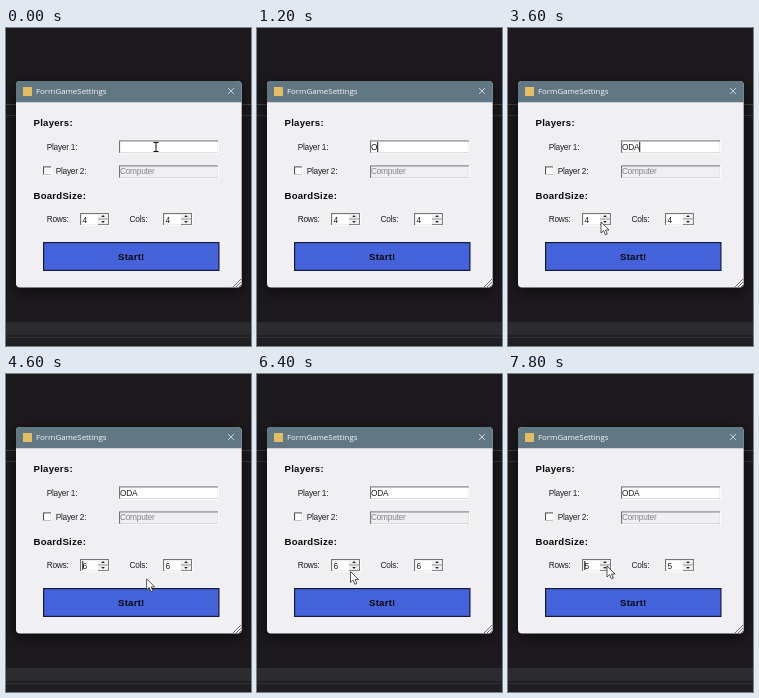
An HTML page with a canvas for the animation above (8000 ms loop, 245x318 px).

```html
<!DOCTYPE html>
<html lang="en">
<head>
<meta charset="utf-8">
<style>
  html, body { margin: 0; width: 100%; height: 100%; overflow: hidden; background: #1c1a1c; }
  canvas { display: block; width: 245px; height: 318px; }
</style>
</head>
<body>
<canvas id="stage"></canvas>
<script>
const W = 245, H = 318, LOOP = 8000, STEP = 200, BLINK = 530;
const canvas = document.getElementById('stage');
const ctx = canvas.getContext('2d');
const scale = window.devicePixelRatio || 1;
canvas.width = W * scale;
canvas.height = H * scale;

const SANS = '"Liberation Sans", Arial, sans-serif';
const LABEL = { font: `8.3px ${SANS}`, spacing: '-0.25px', color: '#202022' };
const MUTED = { ...LABEL, color: '#858588' };
const HEADING = { font: `bold 9.6px ${SANS}`, spacing: '0.25px', color: '#080808' };
const TITLE = { font: '7.9px "Open Sans", "Noto Sans", sans-serif', spacing: '0px', color: '#f6f8f9' };
const PLAYER = 'ODA';

const keyTimes = [1000, 1400, 2200];
const sizeChanges = [[0, 4], [3900, 5], [4300, 6], [7300, 5]];
const caretResets = [400, ...keyTimes, 3900, 4300, 7300];
// Pointer positions as [time, x, y]
const path = [
  [2700, 150, 119], [3400, 93, 194], [3700, 93, 194], [3900, 97, 189],
  [4300, 97, 189], [4800, 164.3, 213.5], [5500, 164.3, 213.5], [6200, 93.5, 197.5],
  [6500, 93.5, 197.5], [7100, 99, 192], [8000, 99, 192]
];

function rect(x, y, w, h, color) {
  ctx.fillStyle = color;
  ctx.fillRect(x, y, w, h);
}

function setFont({ font, spacing }) {
  ctx.font = font;
  ctx.letterSpacing = spacing;
}

function text(str, x, y, style = LABEL) {
  setFont(style);
  ctx.fillStyle = style.color;
  ctx.fillText(str, x, y);
}

function polyline(points, color, width = 1) {
  ctx.beginPath();
  points.forEach(([x, y]) => ctx.lineTo(x, y));
  ctx.strokeStyle = color;
  ctx.lineWidth = width;
  ctx.stroke();
}

function roundBox(x, y, w, h, radii, color) {
  ctx.fillStyle = color;
  ctx.beginPath();
  ctx.roundRect(x, y, w, h, radii);
  ctx.fill();
}

function sunken(x, y, w, h, fill, edge = '#747477') {
  rect(x, y, w, h, '#fafafa');
  rect(x, y, w - 1, h - 1, edge);
  rect(x + 1, y + 1, w - 2, h - 2, '#d8d8da');
  rect(x + 1.4, y + 1.4, w - 2.8, h - 2.8, fill);
}

function spinner(x, value) {
  sunken(x, 185, 30, 13, '#fff');
  text(value, x + 2.6, 194.8);
  for (const [y, dir] of [[186, -1], [191.5, 1]]) {
    rect(x + 18, y, 11, 5.5, '#78787a');
    rect(x + 18, y, 10, 4.6, '#efeff0');
    const cx = x + 23, cy = y + 2.3;
    ctx.fillStyle = '#222';
    ctx.beginPath();
    ctx.moveTo(cx - 1.8, cy - dir * 0.8);
    ctx.lineTo(cx + 1.8, cy - dir * 0.8);
    ctx.lineTo(cx, cy + dir * 1.2);
    ctx.fill();
  }
}

function background() {
  rect(0, 0, W, H, '#1c1a1c');
  rect(0, 76, W, 1, '#454144');
  rect(0, 87, W, 1, '#373437');
  rect(0, 294, W, 13, '#2c2b2e');
  rect(0, 307, W, 2, '#201f21');
  rect(0, 309, W, 1, '#323134');
  rect(0, 310, W, 8, '#1f1e20');
}

function windowFrame() {
  ctx.save();
  ctx.shadowColor = 'rgba(0,0,0,.6)';
  ctx.shadowBlur = 14 * scale;
  ctx.shadowOffsetY = 4 * scale;
  roundBox(10, 53, 225.7, 206.5, 4, '#f0eff2');
  ctx.restore();

  roundBox(10, 53, 225.7, 21.3, [4, 4, 0, 0], '#617783');
  rect(17, 59, 9, 9, '#e3bd62');
  text('FormGameSettings', 30, 66, TITLE);
  polyline([[222, 60], [228, 66]], '#dfe5e8', 0.8);
  polyline([[228, 60], [222, 66]], '#dfe5e8', 0.8);
  for (const d of [2, 5, 8]) polyline([[235 - d, 259], [235, 259 - d]], '#6f6f72');
}

function startButton(raised) {
  const [left, top, right, bottom] = [37.6, 214.6, 212.9, 242.4];
  rect(left, top, right - left, bottom - top, '#4463db');
  ctx.strokeStyle = '#141a38';
  ctx.lineWidth = 1.2;
  ctx.strokeRect(left, top, right - left, bottom - top);
  if (raised) {
    polyline([[left, bottom], [left, top], [right, top]], '#8d97bd', 1.2);
    ctx.setLineDash([1, 1]);
    polyline([[left, top], [right, top]], '#d9dbe2');
    ctx.setLineDash([]);
  }
  text('Start!', 112, 231.7, HEADING);
}

function form(typed, size, raised) {
  text('Players:', 27.5, 98, HEADING);
  text('Player 1:', 40.7, 121.5);
  text('Player 2:', 49.7, 145.7);
  text('BoardSize:', 27.5, 171, HEADING);
  text('Rows:', 40.7, 193.8);
  text('Cols:', 123.6, 193.8);

  sunken(113, 112.4, 100, 13.4, '#fff');
  text(typed, 114, 121.8);
  sunken(113, 137.4, 100, 13.4, '#f0eff2');
  text('Computer', 114, 146.4, MUTED);
  sunken(37, 138.4, 9, 9, '#fff', '#505053');
  spinner(74, size);
  spinner(157, size);
  startButton(raised);
}

function caret(t, typed) {
  const last = caretResets.findLast(time => time <= t);
  if (last === undefined || Math.floor((t - last) / BLINK) % 2) return;
  if (t < 3900) {
    setFont(LABEL);
    rect(114 + ctx.measureText(typed).width, 114, 1, 10, '#111');
  } else {
    rect(76.3, 187, 1, 9, '#111');
  }
}

function iBeam(x, y) {
  rect(x - 0.5, y - 5, 1, 10, '#111');
  for (const end of [-5, 4]) rect(x - 2.5, y + end, 5, 1, '#111');
}

function arrow(x, y) {
  const outline = [[0, 0], [0, 11], [2.6, 8.6], [4.4, 12.8], [6.3, 12], [4.5, 8], [8, 8]];
  ctx.beginPath();
  outline.forEach(([dx, dy]) => ctx.lineTo(x + dx, y + dy));
  ctx.closePath();
  ctx.fillStyle = '#fff';
  ctx.fill();
  ctx.strokeStyle = '#2a2a2c';
  ctx.lineWidth = 0.8;
  ctx.stroke();
}

function pointerAt(t) {
  const next = Math.max(1, path.findIndex(([time]) => time > t));
  const [t0, x0, y0] = path[next - 1], [t1, x1, y1] = path[next];
  const p = Math.min(1, Math.max(0, (t - t0) / (t1 - t0)));
  const ease = p * p * (3 - 2 * p);
  return [x0 + (x1 - x0) * ease, y0 + (y1 - y0) * ease];
}

function pointer(t) {
  if (t >= keyTimes[0] && t < path[0][0]) return;
  const [x, y] = pointerAt(t);
  const overField = x > 113 && y > 111 && y < 127;
  (overField ? iBeam : arrow)(x, y);
}

function draw(now) {
  const t = Math.floor((now % LOOP) / STEP) * STEP;
  const typed = PLAYER.slice(0, keyTimes.filter(time => time <= t).length);
  const size = sizeChanges.findLast(([time]) => time <= t)[1];
  ctx.setTransform(scale, 0, 0, scale, 0, 0);
  background();
  windowFrame();
  form(typed, size, t >= 4800 && t < 5800);
  caret(t, typed);
  pointer(t);
  requestAnimationFrame(draw);
}
requestAnimationFrame(draw);
</script>
</body>
</html>
```
